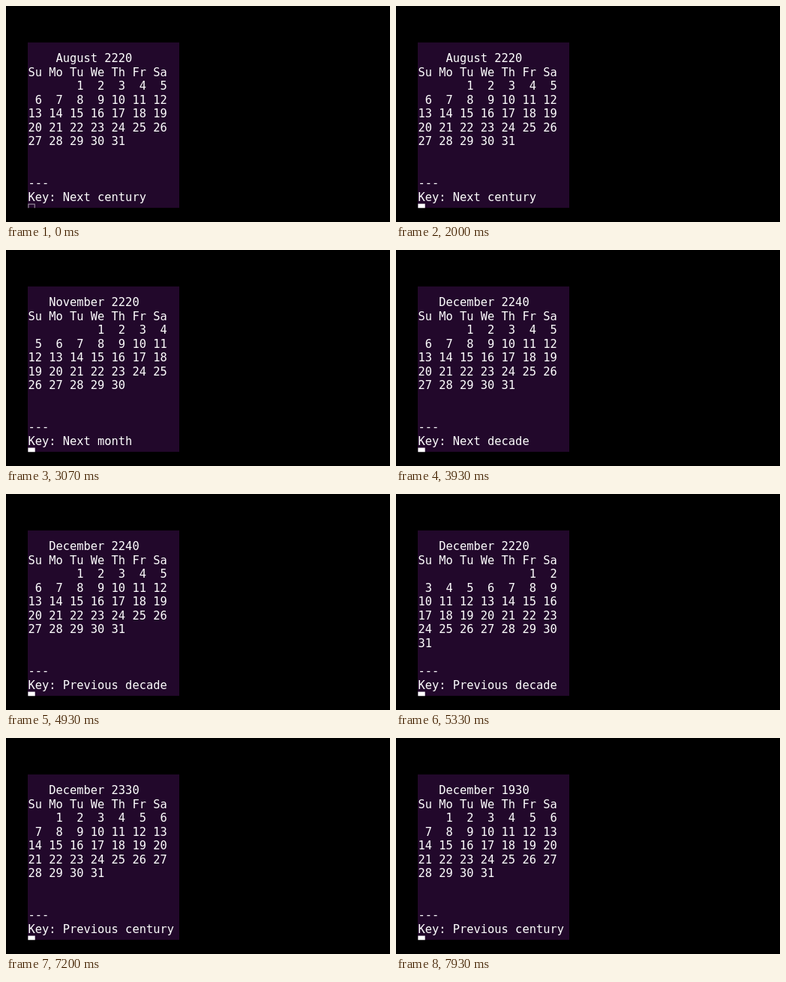
Write an HTML page with a canvas that moves like this. It is 512x289 px and loops after 8000 ms.

```html
<!DOCTYPE html>
<html lang="en">
<head>
<meta charset="utf-8">
<title>Terminal calendar</title>
<style>
  html, body { margin: 0; width: 100%; height: 100%; overflow: hidden; background: #000; }
  canvas { display: block; }
</style>
</head>
<body>
<canvas id="stage" width="512" height="289"></canvas>
<script>
const ctx = document.getElementById('stage').getContext('2d');
const LOOP = 8000;
const FONT_SIZE = 15.4, LEFT = 29.4, BASELINE = 75.1, LINE = 18.55;
const PANEL = { x: 29, y: 48.5, w: 202, h: 221.7 };
const CURSOR = { x: 29.4, y: 264.6, w: 9.3, h: 18 };
const MONTHS = ['January', 'February', 'March', 'April', 'May', 'June', 'July',
  'August', 'September', 'October', 'November', 'December'];

// Months moved by one press of each key.
const STEP = {
  'Next month': 1,
  'Next decade': 120, 'Previous decade': -120,
  'Next century': 1200, 'Previous century': -1200
};

const PRESSES = [
  ['Next month', 2600, 2800, 3070, 3400],
  ['Next decade', 3730, 3930, 4070],
  ['Previous decade', 4930, 5070, 5330, 5800],
  ['Next decade', 6000, 6130],
  ['Next century', 6670, 6870],
  ['Previous century', 7200, 7400, 7530, 7730, 7930]
];
const FOCUS_TIME = 2000;
const REDRAW = { start: 2600, end: 2670 };

function stateAt(t) {
  let month = 2220 * 12 + 7;
  let key = 'Next century';
  for (const [name, ...times] of PRESSES) {
    const count = times.filter(time => time <= t).length;
    if (count) key = name;
    month += count * STEP[name];
  }
  return { year: Math.floor(month / 12), month: month % 12, key };
}

function calendarLines(year, month) {
  const title = `${MONTHS[month]} ${year}`;
  const first = new Date(Date.UTC(year, month, 1)).getUTCDay();
  const days = new Date(Date.UTC(year, month + 1, 0)).getUTCDate();
  const lines = [' '.repeat(Math.floor((20 - title.length) / 2)) + title, 'Su Mo Tu We Th Fr Sa'];
  for (let day = 1 - first; day <= days; day += 7) {
    const week = Array.from({ length: 7 }, (_, i) => {
      const d = day + i;
      return (d < 1 || d > days ? '' : String(d)).padStart(2);
    });
    lines.push(week.join(' '));
  }
  return lines;
}

function drawLine(text, row) {
  const indent = text.length - text.trimStart().length;
  const advance = ctx.measureText('0').width;
  ctx.fillText(text.trim(), LEFT + indent * advance, BASELINE + row * LINE);
}

function drawCursor(focused) {
  const { x, y, w, h } = CURSOR;
  if (focused) {
    ctx.fillRect(x, y, w, h);
  } else {
    ctx.strokeStyle = '#a89fac';
    ctx.lineWidth = 1;
    ctx.strokeRect(x + 0.5, y + 0.5, w - 1, h);
  }
}

function draw(t) {
  const { year, month, key } = stateAt(t);
  ctx.fillStyle = '#000';
  ctx.fillRect(0, 0, 512, 289);

  ctx.save();
  ctx.beginPath();
  ctx.rect(PANEL.x, PANEL.y, PANEL.w, PANEL.h);
  ctx.clip();
  ctx.fillStyle = '#22082b';
  ctx.fillRect(PANEL.x, PANEL.y, PANEL.w, PANEL.h);

  ctx.fillStyle = '#fff';
  ctx.font = `${FONT_SIZE}px "DejaVu Sans Mono", monospace`;
  calendarLines(year, month).forEach(drawLine);
  if (t < REDRAW.start || t >= REDRAW.end) {
    drawLine('---', 9);
    drawLine('Key: ' + key, 10);
    drawCursor(t >= FOCUS_TIME);
  }
  ctx.restore();
}

const start = performance.now();
function frame() {
  draw((performance.now() - start) % LOOP);
  requestAnimationFrame(frame);
}
frame();
</script>
</body>
</html>
```
